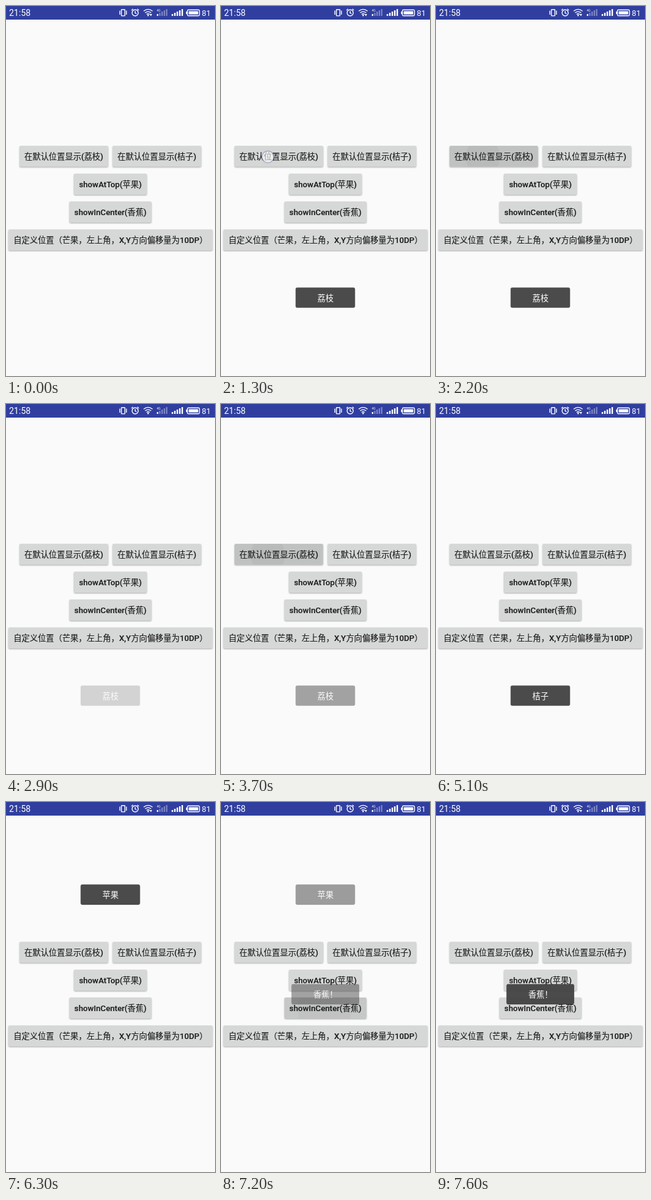
These frames come from a looping animation (339 by 598 pixels, 8 s). An HTML page:

```html
<!DOCTYPE html>
<html lang="zh-CN">
<head>
<meta charset="utf-8">
<title>Toast demo</title>
<style>
html, body { margin: 0; width: 100%; height: 100%; overflow: hidden; background: #fafafa; }
svg { display: block; width: 100vw; height: 100vh; }
text { font-family: Roboto, "Noto Sans CJK SC", "Noto Sans CJK", sans-serif; font-size: 13.18px; }
.label { font-weight: 500; fill: #1c1c1c; stroke: #1c1c1c; stroke-width: .15px; text-anchor: middle; }
.button { fill: #d6d7d7; filter: drop-shadow(0 1px 1px rgba(0,0,0,.33)); }

.press, .wave, .finger, .toast {
  opacity: 0;
  animation: 8s linear infinite;
}
.press { animation-name: press; animation-delay: var(--t); }
.wave { opacity: 1; animation-name: wave; animation-delay: var(--t); }
.finger { animation-name: finger; animation-delay: var(--t); }
@keyframes press { 0%, 1.2% { opacity: 0 } 2.2%, 3% { opacity: 1 } 6%, 100% { opacity: 0 } }
@keyframes wave { 0%, 1.2% { r: 12px } 6%, 100% { r: 72px } }
@keyframes finger { 0%, 1.6% { opacity: 1 } 2%, 100% { opacity: 0 } }

.toast rect { fill: rgba(66,66,66,.95); stroke: rgba(40,40,40,.45); stroke-width: .7px; }
.toast text { fill: #fff; text-anchor: middle; }
@keyframes lychee { 0%, 6.25% { opacity: 0 } 9.4%, 33% { opacity: 1 } 37.2%, 100% { opacity: 0 } }
@keyframes lycheeAgain { 0%, 45% { opacity: 0 } 47.5%, 57.5% { opacity: 1 } 60%, 100% { opacity: 0 } }
@keyframes orange { 0%, 57.5% { opacity: 0 } 60%, 72.5% { opacity: 1 } 75.6%, 100% { opacity: 0 } }
@keyframes apple { 0%, 72.5% { opacity: 0 } 75%, 88.75% { opacity: 1 } 91.5%, 100% { opacity: 0 } }
@keyframes banana { 0%, 88.75% { opacity: 0 } 91.25%, 100% { opacity: 1 } }

.line { fill: none; stroke: #fff; stroke-width: 1.4; }
.traffic { animation: traffic 8s step-end infinite; }
@keyframes traffic {
  0%, 11.25%, 26.25%, 37.5%, 47.5%, 58.75%, 70%, 88.75% { opacity: 1 }
  10%, 25%, 36.25%, 46.25%, 57.5%, 67.5%, 87.5% { opacity: 0 }
}
</style>
</head>
<body>
<svg id="stage" viewBox="0 0 339 598" preserveAspectRatio="none">
  <rect width="339" height="598" fill="#fafafa"/>
  <rect width="339" height="22" fill="#303f9f"/>
  <g fill="#fff">
    <text x="5" y="15.8" style="font-size:14px">21:58</text>
    <text x="317.5" y="15.5" style="font-size:13px">81</text>
    <g class="line">
      <rect x="187.2" y="5.7" width="5.6" height="10.2" rx=".6"/>
      <path d="M184.6 7.5v6.6M195.4 7.5v6.6"/>
      <circle cx="209.5" cy="11" r="5"/>
      <path d="M209.5 8v3.3l2.3 1.2M203.5 7l2.6-2.3M215.5 7l-2.6-2.3"/>
      <path d="M223.3 8.2q7.2-5.6 14.4 0M225.6 11q4.9-3.8 9.8 0M228 13.5q2.5-1.9 5 0"/>
      <rect x="294.2" y="6.3" width="19.6" height="9.4" rx="1.6"/>
    </g>
    <circle cx="230.5" cy="15.2" r="1.2"/>
    <path class="traffic" d="M233 13h4l-2 3.6z"/>
    <rect x="292" y="9" width="1.8" height="4"/>
    <rect x="296.3" y="8.4" width="15.4" height="5.2"/>
    <text x="244.5" y="9" style="font-size:5px">4G</text>
    <g id="bars"></g>
  </g>
  <defs id="clips"></defs>
  <g id="buttons"></g>
  <g id="fingers"></g>
  <g id="toasts"></g>
</svg>
<script>
const add = (id, markup) => document.getElementById(id).insertAdjacentHTML('beforeend', markup);

for (let i = 0; i < 5; i++) {
  const h = 3 + i * 2;
  add('bars', `<rect x="${268.7 + i * 4}" y="${16 - h}" width="2.4" height="${h}"/>
    <rect x="${244.7 + i * 3.7}" y="${16 - h}" width="2.2" height="${h}" opacity="${i ? .38 : 1}"/>`);
}

// Press times are in milliseconds within the loop.
const buttons = [
  { label: '在默认位置显示(荔枝)', x: 22, w: 143.5, row: 0, finger: 76, presses: [300, 750, 1200, 1600, 2000, 3500] },
  { label: '在默认位置显示(桔子)', x: 173, w: 143.5, row: 0, finger: 245, presses: [4400] },
  { label: 'showAtTop(苹果)', x: 110.3, w: 118, row: 1, finger: 168, presses: [5600] },
  { label: 'showInCenter(香蕉)', x: 102.9, w: 133, row: 2, finger: 168, presses: [6900] },
  { label: '自定义位置（芒果，左上角，X,Y方向偏移量为10DP）', x: 4, w: 331, row: 3, finger: 0, presses: [] },
];

buttons.forEach(({ label, x, w, row, finger, presses }, i) => {
  const y = 225.9 + row * 45.1;
  const box = `x="${x}" y="${y}" width="${w}" height="33.9" rx="1.9"`;
  const ripples = presses.map(t => `<g class="press" style="--t:${t}ms">
    <rect ${box} fill-opacity=".1"/>
    <circle class="wave" cx="${finger}" cy="${y + 18}" r="12" fill-opacity=".035"/></g>`).join('');
  add('clips', `<clipPath id="clip${i}"><rect ${box}/></clipPath>`);
  add('buttons', `<rect class="button" ${box}/>
    <g clip-path="url(#clip${i})">${ripples}</g>
    <text class="label" x="${x + w / 2}" y="${y + 22.2}">${label}</text>`);
  presses.forEach(t => add('fingers', `<g class="finger" style="--t:${t}ms">
    <circle cx="${finger}" cy="${y + 18}" r="9.5" fill="#fff" fill-opacity=".6"
      stroke="#7f8bb0" stroke-width="1.2" stroke-opacity=".75"/></g>`));
});

const toasts = [
  ['lychee', '荔枝', 455.2, 96],
  ['lycheeAgain', '荔枝', 455.2, 96],
  ['orange', '桔子', 455.2, 96],
  ['apple', '苹果', 133.5, 96],
  ['banana', '香蕉！', 294.5, 109.5],
];
for (const [name, label, y, w] of toasts) {
  add('toasts', `<g class="toast" style="animation-name:${name}">
    <rect x="${169.2 - w / 2}" y="${y}" width="${w}" height="32.4" rx="2.4"/>
    <text x="169.4" y="${y + 21.3}">${label}</text></g>`);
}
</script>
</body>
</html>
```
